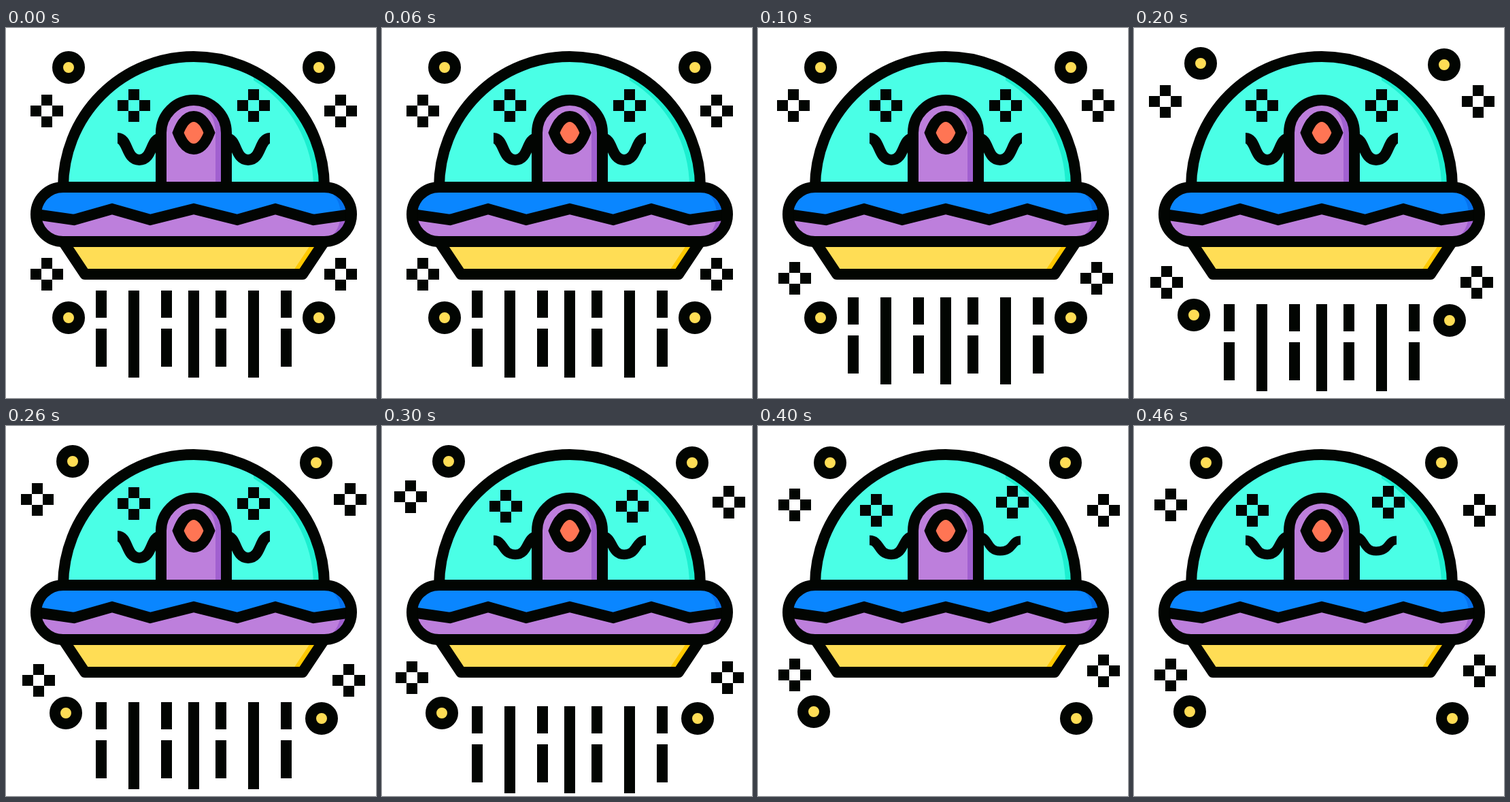
Animation, 544 px wide and 544 px high, one loop 0.5 s. Source, as an HTML page:

```html
<!DOCTYPE html>
<html lang="en">
<head>
<meta charset="utf-8">
<title>Flying saucer</title>
<style>
  html, body { margin: 0; width: 100%; height: 100%; overflow: hidden; background: #fff; }
  svg { display: block; width: 100vw; height: 100vh; }
  .line { stroke: #020502; stroke-width: 16; }
  .open { fill: none; }
  .ink { fill: #020502; }
</style>
</head>
<body>
<svg id="stage" viewBox="0 0 544 544">
  <!-- dome -->
  <path fill="#4affe6" d="M84 234A192 192 0 0 1 468 234Z"/>
  <path fill="#1cefd0" d="M364 77A184 184 0 0 1 452 234H468A192 192 0 0 0 364 63Z"/>
  <path class="line open" d="M84 234A192 192 0 0 1 468 234"/>

  <!-- pilot -->
  <g id="arms"></g>
  <path fill="#bd7fdc" d="M228 234V154A48 48 0 0 1 324 154V234Z"/>
  <path fill="#a160d0" d="M284 110C300 120 308 136 308 154V234H324V154A48 48 0 0 0 284 107Z"/>
  <path class="line open" d="M228 234V154A48 48 0 0 1 324 154V234"/>
  <path class="line" fill="#ff7554" d="M253 154Q262 130 276 130Q290 130 299 154Q290 178 276 178Q262 178 253 154Z"/>

  <!-- base -->
  <path fill="#ffdd55" d="M84 314L116 362H436L468 314Z"/>
  <path fill="#ffc800" d="M447 320L423 356H436L464 314Z"/>
  <path class="line open" stroke-linejoin="round" d="M84 314L116 362H436L468 314"/>

  <!-- hull -->
  <rect x="44" y="234" width="464" height="80" rx="40" fill="#0a86ff"/>
  <path fill="#0672ee" d="M464 234C484 240 492 258 492 274H508A40 40 0 0 0 468 234Z"/>
  <path id="belly" fill="#bd7fdc"/>
  <path fill="#a160d0" d="M492 274C492 290 484 308 464 314H468A40 40 0 0 0 508 274Z"/>
  <path id="zigzag" class="line open"/>
  <rect class="line open" x="44" y="234" width="464" height="80" rx="40"/>
</svg>
<script>
const STEPS = 5, LOOP = 500, MID = 276;
const SIDES = [-1, 1];
const byId = id => document.getElementById(id);
const stage = byId('stage');

function add(parent, tag, attrs) {
  const el = document.createElementNS('http://www.w3.org/2000/svg', tag);
  for (const key in attrs) el.setAttribute(key, attrs[key]);
  return parent.appendChild(el);
}

// Holds pose(n) for one step, then jumps to the next.
function play(el, pose) {
  const frames = Array.from({ length: STEPS + 1 }, (_, i) =>
    ({ ...pose(Math.min(i, STEPS - 1)), offset: i / STEPS, easing: 'step-end' }));
  el.animate(frames, { duration: LOOP, iterations: Infinity }).startTime = 0;
}

const move = (x, y) => ({ transform: `translate(${x}px, ${y}px)` });
const snap = v => 2 * Math.round(v / 2);

function sparkle(pose) {
  const d = 'M-8-24h16v16h-16zM-8 8h16v16h-16zM-24-8h16v16h-16zM8-8h16v16h-16z';
  play(add(stage, 'path', { class: 'ink', d }), pose);
}

// Hull zigzag
let zigzag = '';
for (let i = -4; i <= 4; i++) {
  const y = Math.abs(i) === 4 ? 274 : i % 2 ? 282 : 266;
  zigzag += `${zigzag ? 'L' : 'M'}${MID + 56 * i + 8 * Math.sign(i)} ${y}`;
}
byId('zigzag').setAttribute('d', zigzag);
byId('belly').setAttribute('d', zigzag + 'A40 40 0 0 1 468 314H84A40 40 0 0 1 44 274Z');

for (const side of SIDES) {
  const left = side < 0;

  for (const end of SIDES) {
    const top = end < 0;

    // Corner sparkles drift outwards, turn, then swing back.
    const peak = top ? 14 : 12;
    const turn = left && top ? 4 : -4;
    sparkle(n => {
      let out = snap(peak * n / 2), rise = out;
      if (n === 3) [out, rise] = [peak + 4, peak + turn];
      if (n === 4) [out, rise] = left ? [6, peak - 8] : [16, -2];
      return move(MID + side * (216 + out), 242 + end * (120 + rise));
    });

    // Orbs hop every second step: inwards above, outwards below.
    const orb = add(stage, 'circle', { class: 'line', r: 16, fill: '#ffdd55' });
    play(orb, n => {
      const hop = n >> 1;
      const dx = hop * (left ? 4 - end + hop : 4);
      const dy = hop && (left ? end * (3 - 2 * hop) - 5 : 4 * end);
      return move(MID + side * (184 + end * dx), 242 + end * 184 + dy);
    });
  }

  // Sparkles inside the dome stay put, then slide apart.
  sparkle(n => {
    const k = Math.max(0, n - 2);
    const out = k * (k + (left ? 5 : 3));
    const fall = k * (left ? 3 + k : 9 - 5 * k);
    return move(MID + side * (88 + out), 114 + fall);
  });

  // Arms sag from their resting wave; the right one keeps pulling in.
  const arm = add(byId('arms'), 'path', { class: 'line open' });
  play(arm, n => {
    const k = Math.max(0, n - 2);
    const bend = left ? Math.min(k, 1) : k;
    const low = 194 - 5 * bend;
    const tip = k ? 168 : 162;
    const reach = bend > 1 ? 110 : 112;
    const x = d => MID + side * d;
    const d = `M${x(48)} 162C${x(64)} 162 ${x(60)} ${low} ${x(80)} ${low}` +
      `S${x(96)} ${tip} ${x(reach)} ${tip}`;
    return { d: `path("${d}")`, strokeWidth: `${16 - 1.5 * bend}px` };
  });
}

// Beam: solid and dashed bars alternate, slide down and vanish.
const beam = add(stage, 'g', { class: 'ink' });
for (let i = -3; i <= 3; i++) {
  const x = MID - 8 + 48 * i - 8 * Math.sign(i);
  const bars = i % 2 ? 'v40h16v-40zm0 56v56h16v-56z' : 'v128h16v-128z';
  add(beam, 'path', { d: `M${x} 386${bars}` });
}
play(beam, n => ({ ...move(0, Math.min(10 * n, 26)), opacity: n < 4 ? 1 : 0 }));
</script>
</body>
</html>
```
